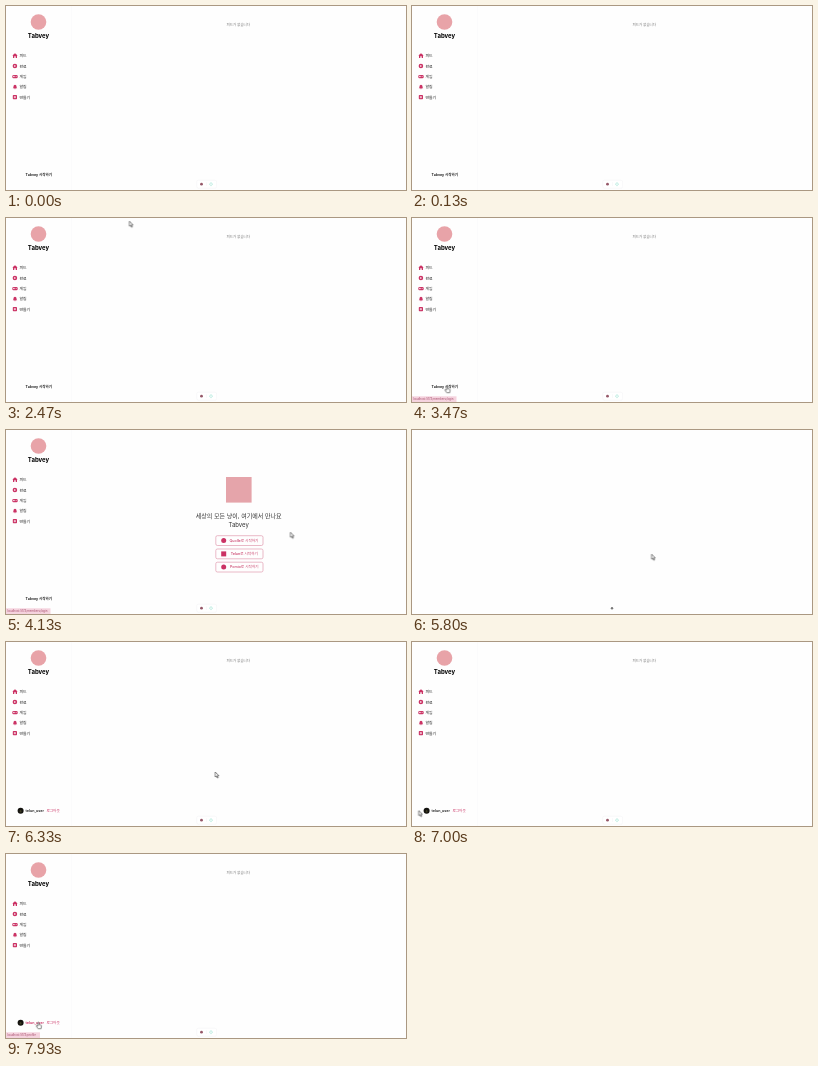
An HTML page that plays this animation: 400 by 184 pixels, repeating every 8 s.

```html
<!DOCTYPE html>
<html lang="ko">
<head>
<meta charset="utf-8">
<title>Tabvey</title>
<style>
html, body { margin: 0; width: 100%; height: 100%; overflow: hidden; background: #fefefe; }
svg { display: block; width: 100%; height: 100%; }
text { font-family: Inter, "Noto Sans CJK KR", "Noto Sans CJK", sans-serif; font-size: 3.65px; fill: #222; }
.mid { text-anchor: middle; }
.bold { font-weight: 700; }
.nav text { font-size: 3.9px; font-weight: 500; }
.icon { fill: #cb3264; }
.cut { fill: none; stroke: #fff; stroke-width: .7; }
.login .box { fill: #fefefe; stroke: #dc8ca3; stroke-width: .6; }
.login .label { fill: #c93c68; font-weight: 500; }
.login .head { font-size: 6px; fill: #333; }
.status rect { fill: #f5d3de; }
.status text { font-size: 2.85px; fill: #a34868; }

/* One loop is 8 s, so 1% is 80 ms. */
.shell, .blank, .feed, .guest, .login, .user, .plain, .hover,
.to-login, .to-profile, .arrow, .hand { animation: 8s step-end infinite; }
.shell { animation-name: shell; }
.blank { animation-name: blank; }
.feed { animation-name: feed; }
.guest { animation-name: guest; }
.login { animation-name: login; }
.user { animation-name: user; }
.plain { animation-name: plain; }
.hover { animation-name: hover; }
.to-login { animation-name: to-login; }
.to-profile { animation-name: to-profile; }
.arrow { animation-name: arrow; }
.hand { animation-name: hand; }
.cursor { animation: move 8s ease-in-out infinite; }

@keyframes shell { 0%, 76.6%, 100% { opacity: 1 } 72.4% { opacity: 0 } }
@keyframes blank { 0%, 76.6%, 100% { opacity: 0 } 72.4% { opacity: 1 } }
@keyframes feed { 0%, 76.6%, 100% { opacity: 1 } 46.5% { opacity: 0 } }
@keyframes guest { 0% { opacity: 1 } 72.4%, 100% { opacity: 0 } }
@keyframes login { 0%, 72.4%, 100% { opacity: 0 } 46.5% { opacity: 1 } }
@keyframes user { 0% { opacity: 0 } 76.6%, 100% { opacity: 1 } }
@keyframes plain { 0% { opacity: 1 } 91.5%, 100% { opacity: 0 } }
@keyframes hover { 0% { opacity: 0 } 91.5%, 100% { opacity: 1 } }
@keyframes to-login { 0%, 54.2%, 100% { opacity: 0 } 43.3% { opacity: 1 } }
@keyframes to-profile { 0% { opacity: 0 } 95%, 100% { opacity: 1 } }
@keyframes arrow {
  0%, 41%, 58.5%, 91.5%, 100% { opacity: 0 }
  30.8%, 46.5%, 72.4% { opacity: 1 }
}
@keyframes hand {
  0%, 46.5%, 72.4% { opacity: 0 }
  41%, 58.5%, 91.5%, 100% { opacity: 1 }
}
@keyframes move {
  0%, 30.875% { transform: translate(123.4px, 3.2px) }
  36.625%, 38.375% { transform: translate(65px, 140.3px) }
  41.625%, 45.6% { transform: translate(34.5px, 168.2px) }
  51.625% { transform: translate(284.4px, 102.3px) }
  53.375%, 54.125% { transform: translate(284.4px, 105.2px) }
  62.5%, 76.625% { transform: translate(239.6px, 124.2px) }
  86.625%, 87.5% { transform: translate(6.7px, 168.6px) }
  95% { transform: translate(32.8px, 168.4px) }
  99%, 100% { transform: translate(31.8px, 168.2px) }
}
</style>
</head>
<body>
<svg viewBox="0 0 400 184" preserveAspectRatio="none">
  <g class="shell">
    <path d="M65.5 0V184" stroke="#f8f8fa" stroke-width=".6"/>
    <circle cx="32.5" cy="16" r="7.8" fill="#e8a3a8"/>
    <text class="mid bold" x="32.5" y="32.3" style="font-size:6px;fill:#000">Tabvey</text>
    <g class="nav">
      <path class="icon" d="M9 47.2l2.7 2.4h-.7v2.3H9.7v-1.6H8.3v1.6H7v-2.3h-.7z"/>
      <circle class="icon" cx="8.9" cy="60" r="2.3"/>
      <path d="M8.2 58.9l1.9 1.1-1.9 1.1z" fill="#fff"/>
      <rect class="icon" x="6.3" y="68.9" width="5.4" height="3.3" rx="1.3"/>
      <path class="cut" d="M7.2 70.5h1.4M7.9 69.8v1.4M9.7 70.5h.9"/>
      <path class="icon" d="M6.8 82.2l.7-1V80.2a1.5 1.5 0 0 1 3 0v1l.7 1zM8.3 82.5h1.4a.7.7 0 0 1-1.4 0z"/>
      <rect class="icon" x="6.8" y="89" width="4.2" height="4.2" rx=".7"/>
      <path class="cut" d="M7.8 91.1h2.2M8.9 90v2.2"/>
      <text x="13.4" y="51.1">피드</text>
      <text x="13.4" y="61.5">완료</text>
      <text x="13.4" y="71.9">게임</text>
      <text x="13.4" y="82.3">알림</text>
      <text x="13.4" y="92.7">만들기</text>
    </g>
    <rect x="190.7" y="174.2" width="20" height="8" rx="1.8" fill="#fff" stroke="#f0f0f2" stroke-width=".5"/>
    <path d="M200.6 176.3v3.8" stroke="#ededf0" stroke-width=".4"/>
    <circle cx="195.5" cy="178.2" r="1.4" fill="#955768"/>
    <g fill="none" stroke="#a5e5d5" stroke-width=".5">
      <circle cx="205" cy="178.2" r="1.2"/>
      <path d="M205 176.2v1M205 179.2v1M203 178.2h1M206 178.2h1"/>
    </g>
  </g>

  <circle class="blank" cx="200" cy="178.2" r="1.2" fill="#777"/>

  <text class="feed mid" x="232.3" y="20" style="font-size:3.5px;fill:#777">피드가 없습니다</text>
  <text class="guest bold" x="19.6" y="170.4" style="font-size:3.55px">Tabvey 시작하기</text>

  <g class="login">
    <rect x="220" y="47" width="25.6" height="25.6" fill="#e5a4aa"/>
    <text class="head mid" x="232.7" y="87.8">세상의 모든 냥이, 여기에서 만나요</text>
    <text class="head mid" x="232.7" y="97.2">Tabvey</text>
    <rect class="box" x="209.8" y="105.7" width="47.2" height="9.8" rx="1.6"/>
    <rect class="box" x="209.8" y="119" width="47.2" height="9.8" rx="1.6"/>
    <rect class="box" x="209.8" y="132.2" width="47.2" height="9.8" rx="1.6"/>
    <circle class="icon" cx="217.7" cy="110.6" r="2.5"/>
    <rect class="icon" x="215.2" y="121.4" width="5" height="5"/>
    <circle class="icon" cx="217.7" cy="137.1" r="2.5"/>
    <text class="label mid" x="238" y="111.9">Quolle로 시작하기</text>
    <text class="label mid" x="238.3" y="125.2">Telun로 시작하기</text>
    <text class="label mid" x="238.3" y="138.4">Pomio로 시작하기</text>
  </g>

  <g class="user">
    <circle cx="14.6" cy="168.8" r="3" fill="#14130f"/>
    <ellipse cx="14.6" cy="169.2" rx=".9" ry="1.3" fill="#3b3a22"/>
    <g style="font-weight:600">
      <text class="plain" x="19.6" y="170">telun_user</text>
      <text class="hover" x="19.6" y="170" style="fill:#cb3264">telun_user</text>
    </g>
    <text x="40.4" y="170.1" style="fill:#cb3264;font-weight:500">로그아웃</text>
  </g>

  <g class="status to-login">
    <rect y="178.3" width="44.5" height="5.7"/>
    <text x="1.2" y="182.2">localhost:5173/members/login</text>
  </g>
  <g class="status to-profile">
    <rect y="178.3" width="34" height="5.7"/>
    <text x="1.2" y="182.2">localhost:5173/profile</text>
  </g>

  <g class="cursor" fill="#fff" stroke="#333" stroke-width=".6" stroke-linejoin="round">
    <path class="arrow" d="M0 0V5l1.2-1 .8 2 1-.4-.8-1.9h1.5z"/>
    <path class="hand" d="M0 .5q.6-.9 1.2 0V2.5l2 .5q.6.3.5 1L3.2 6.5H.3L-1.5 4q0-.8.7-.6L0 4z"/>
  </g>
</svg>
</body>
</html>
```
